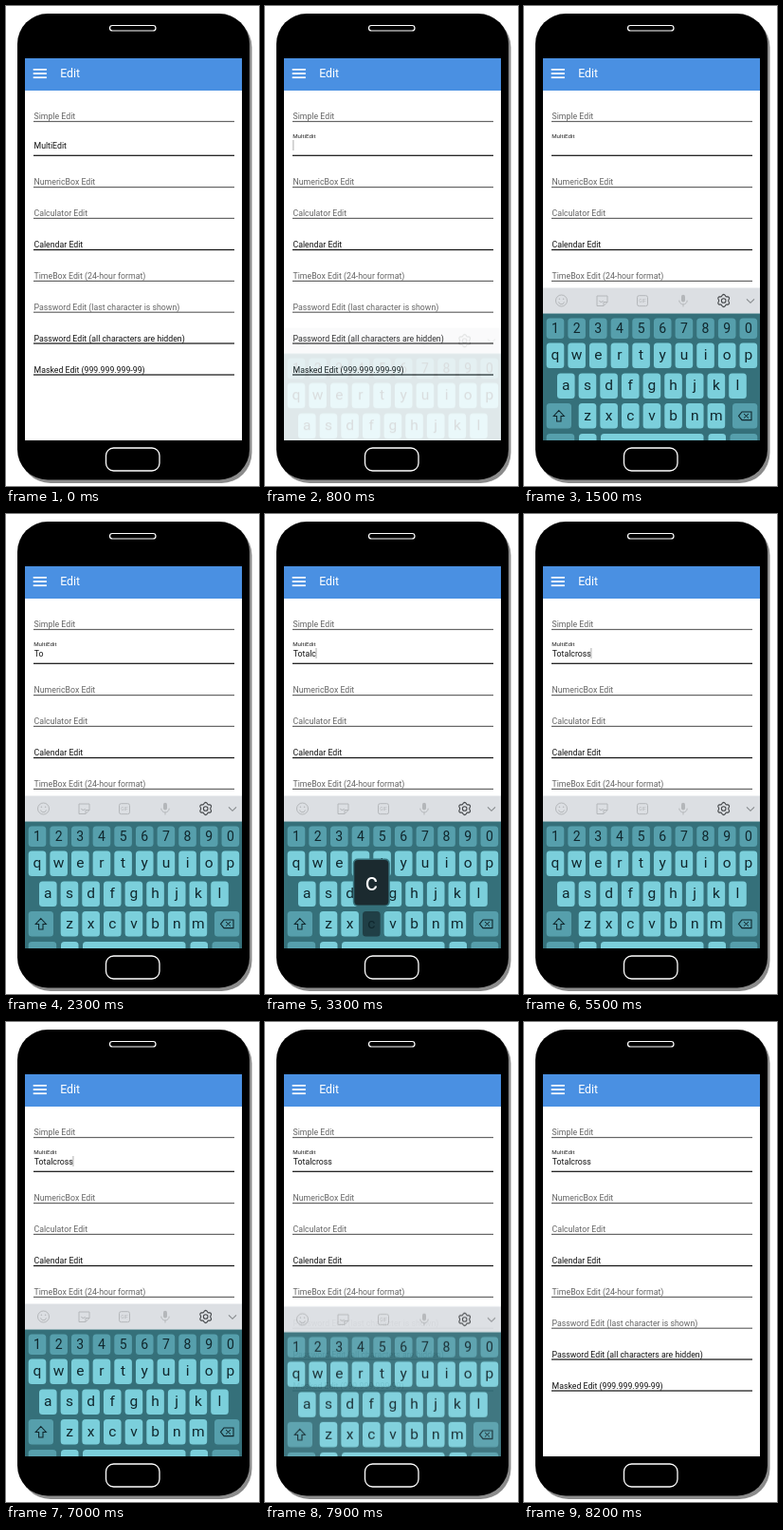
Write an HTML page with a canvas that moves like this. It is 267 px wide and 505 px high and loops after 8.3 s.

```html
<!DOCTYPE html>
<html lang="en">
<head>
<meta charset="utf-8">
<title>Edit form</title>
<style>
  html, body { margin: 0; width: 100%; height: 100%; overflow: hidden; background: #fff; }
  canvas { display: block; width: 267px; height: 505px; }
</style>
</head>
<body>
<canvas id="stage"></canvas>
<script>
const W = 267, H = 505, LOOP = 8300, STEP = 100;
const FONT = 'Roboto, "Open Sans", sans-serif';
const ratio = window.devicePixelRatio || 1;

function prepare(canvas) {
  canvas.width = W * ratio;
  canvas.height = H * ratio;
  const context = canvas.getContext('2d');
  context.scale(ratio, ratio);
  return context;
}

const stage = prepare(document.getElementById('stage'));
const layer = prepare(document.createElement('canvas'));
let ctx = stage;

// label, baseline, rule position, enabled
const fields = [
  ['Simple Edit', 119.2, 121.5, false],
  ['', 150, 157.3, true],
  ['NumericBox Edit', 188.3, 190.6, false],
  ['Calculator Edit', 221.2, 223.4, false],
  ['Calendar Edit', 254.2, 256.5, true],
  ['TimeBox Edit (24-hour format)', 287.2, 289.4, false],
  ['Password Edit (last character is shown)', 320, 322.2, false],
  ['Password Edit (all characters are hidden)', 352.9, 355, true],
  ['Masked Edit (999.999.999-99)', 385.7, 388, true]
];

// key presses: start time and letter
const presses = [
  [1800, 'T'], [2100, 'o'], [2400, 't'], [2700, 'a'], [3000, 'l'],
  [3200, 'c'], [3400, 'r'], [3800, 'o'], [4100, 's'], [4500, 's']
];
const HOLD = 200, FOCUS = 500, BLUR = 8100;
const SHIFT_DOWN = 1600, SHIFT_UP = 1700;

const PITCH = 22.65, KEY_W = 18.6;
const LIGHT = '#7bcfdb', MID = '#569fac', INK = '#10272d';
const rows = [
  { keys: '1234567890', x: 33, y: 328.5, h: 21.5, fill: MID },
  { keys: 'qwertyuiop', x: 33, y: 354.5, h: 26.5, fill: LIGHT },
  { keys: 'asdfghjkl', x: 44.3, y: 386.5, h: 26.5, fill: LIGHT },
  { keys: 'zxcvbnm', x: 67, y: 418, h: 26.5, fill: LIGHT }
];

const clamp = v => Math.max(0, Math.min(1, v));
const smooth = v => { v = clamp(v); return v * v * (3 - 2 * v); };

function box(x, y, w, h, r, fill) {
  ctx.beginPath();
  ctx.roundRect(x, y, w, h, r);
  if (fill) { ctx.fillStyle = fill; ctx.fill(); }
}

function text(str, x, y, size, color, align = 'left') {
  ctx.font = `${size}px ${FONT}`;
  ctx.textAlign = align;
  ctx.fillStyle = color;
  ctx.fillText(str, x, y);
}

function outline(color, width) {
  ctx.strokeStyle = color;
  ctx.lineWidth = width;
  ctx.stroke();
}

function stroke(points, color, width = 1, close = false) {
  ctx.beginPath();
  points.forEach(([x, y]) => ctx.lineTo(x, y));
  if (close) ctx.closePath();
  outline(color, width);
}

function circle(x, y, r, from = 0, to = Math.PI * 2) {
  ctx.beginPath();
  ctx.arc(x, y, r, from, to);
}

function drawPhone() {
  ctx.fillStyle = '#fff';
  ctx.fillRect(0, 0, W, H);
  box(15, 11.5, 244.5, 490.5, 32, '#8b8b8b');
  box(12, 8, 245, 490.5, 32, '#000');
  box(109.5, 20.5, 48.5, 5.5, 2.75);
  outline('#fff', 1.2);
  box(105.5, 465, 56.5, 24, 8);
  outline('#fff', 1.3);
  ctx.fillStyle = '#fff';
  ctx.fillRect(20, 55, 229, 402);
}

function drawHeader() {
  ctx.fillStyle = '#4a90e2';
  ctx.fillRect(20, 55, 229, 34);
  ctx.fillStyle = '#fff';
  for (let i = 0; i < 3; i++) ctx.fillRect(28.7, 66 + i * 4.2, 14.2, 1.7);
  text('Edit', 57.2, 75.2, 12.3, '#fff');
}

function drawFields(t) {
  for (const [label, base, rule, on] of fields) {
    text(label, 29.5, base, 8.75, on ? '#111' : '#646464');
    ctx.fillStyle = on ? '#111' : '#666';
    ctx.fillRect(29, rule - 0.6, 212, 1.2);
  }
  if (t < FOCUS) {
    text('MultiEdit', 29.5, 150, 8.75, '#111');
    return;
  }
  text('MultiEdit', 29.2, 138.6, 6.2, '#222');
  const typed = presses.filter(p => t >= p[0]).map(p => p[1]).join('');
  text(typed, 29.8, 150, 8.75, '#111');
  const blink = t < 900 || Math.floor((t - 450) / 350) % 2 === 0;
  if (blink && t < BLUR) {
    ctx.fillStyle = '#999';
    ctx.fillRect(29.5 + ctx.measureText(typed).width, 141, 0.8, 11);
  }
}

function drawToolbar() {
  const pale = '#b4b7ba', ink = '#44474a', y = 310;
  ctx.fillStyle = '#dcdfe3';
  ctx.fillRect(20, 296.5, 229, 27);

  // smiley
  circle(39.5, y, 6);
  outline(pale, 1);
  circle(39.5, y + 0.8, 3, 0.2, Math.PI - 0.2);
  outline(pale, 1);
  for (const dx of [-2.1, 2.1]) {
    circle(39.5 + dx, y - 1.8, 0.8);
    ctx.fillStyle = pale;
    ctx.fill();
  }

  // sticker
  stroke([[77, 305], [88, 305], [88, 311.5], [84, 315.5], [77, 315.5]], pale, 1, true);
  stroke([[88, 311.5], [84, 311.5], [84, 315.5]], pale);
  circle(81.5, 309.5, 2, 0.2, Math.PI - 0.2);
  outline(pale, 1);

  // animated image
  box(119.5, 304.7, 11, 11, 2);
  outline(pale, 1);
  text('GIF', 125, 312, 5, pale, 'center');

  // microphone
  box(166, 303.8, 4, 7.6, 2, pale);
  circle(168, 309.7, 4.2, 0, Math.PI);
  outline(pale, 1);
  stroke([[168, 314], [168, 316.5]], pale);

  // gear
  const teeth = [];
  for (let i = 0; i < 48; i++) {
    const a = i / 48 * Math.PI * 2;
    const r = 5.8 - 0.8 * Math.cos(6 * a);
    teeth.push([210.7 + r * Math.cos(a), y + r * Math.sin(a)]);
  }
  stroke(teeth, ink, 1.1, true);
  circle(210.7, y, 2.3);
  outline(ink, 1.1);

  stroke([[235, 308.3], [239, 312.3], [243, 308.3]], '#85898c', 1.1);
}

function drawKeys(t, held) {
  const upper = t >= SHIFT_UP && t < presses[0][0];
  const pressed = '#203f46';
  ctx.fillStyle = '#35707a';
  ctx.fillRect(20, 323.5, 229, 134);

  let popup = null;
  for (const row of rows) {
    const small = row.h < 25;
    [...row.keys].forEach((key, i) => {
      const x = row.x + i * PITCH;
      const down = held && held[1].toLowerCase() === key;
      box(x - KEY_W / 2, row.y, KEY_W, row.h, 3.5, down ? pressed : row.fill);
      const label = upper ? key.toUpperCase() : key;
      text(label, x, row.y + row.h / 2 + (small ? 5 : 4.7), small ? 14 : 15.5, INK, 'center');
      if (down) popup = { x, y: row.y, label: held[1] };
    });
  }

  // shift and backspace
  const shifting = t >= SHIFT_DOWN && t < SHIFT_UP;
  box(23.7, 418, 26.3, 26.5, 3.5, shifting ? pressed : MID);
  stroke([[36.8, 425.5], [42.3, 431.5], [39, 431.5], [39, 437],
    [34.6, 437], [34.6, 431.5], [31.3, 431.5]], INK, 1.1, true);
  if (upper) { ctx.fillStyle = INK; ctx.fill(); }
  box(220, 418, 26.3, 26.5, 3.5, MID);
  stroke([[226.5, 431.3], [230, 427], [240, 427], [240, 435.6], [230, 435.6]], INK, 1.1, true);
  stroke([[232, 429], [237, 433.6]], INK);
  stroke([[237, 429], [232, 433.6]], INK);

  // top edge of the space row
  for (const [x, w, fill] of [[23.7, 29.5, MID], [58, 18.5, LIGHT],
    [81, 108.5, LIGHT], [194.5, 18.5, LIGHT], [217.5, 28.8, MID]]) {
    box(x, 450, w, 14, 3.5, fill);
  }

  if (popup) {
    box(popup.x - 19.5, popup.y - 55.5, 39, 50.5, 5, '#35707a');
    box(popup.x - 18, popup.y - 54, 36, 47.5, 4, '#1b2a2f');
    text(popup.label, popup.x, popup.y - 22, 25, '#fff', 'center');
  }
}

// The keyboard fades as one sheet, so it is painted on its own layer first.
function drawKeyboard(t) {
  const shown = smooth((t - 650) / 600) * (1 - smooth((t - 7850) / 350));
  if (shown <= 0) return;
  ctx = layer;
  ctx.clearRect(0, 0, W, H);
  drawToolbar();
  drawKeys(t, presses.find(p => t >= p[0] && t < p[0] + HOLD));
  ctx = stage;

  ctx.save();
  ctx.beginPath();
  ctx.rect(20, 89, 229, 368);
  ctx.clip();
  ctx.globalAlpha = shown;
  ctx.drawImage(layer.canvas, 0, 50 * (1 - shown), W, H);
  ctx.restore();
}

const begin = performance.now();

function frame() {
  const t = Math.floor((performance.now() - begin) % LOOP / STEP) * STEP;
  drawPhone();
  drawHeader();
  drawFields(t);
  drawKeyboard(t);
  requestAnimationFrame(frame);
}
frame();
</script>
</body>
</html>
```
